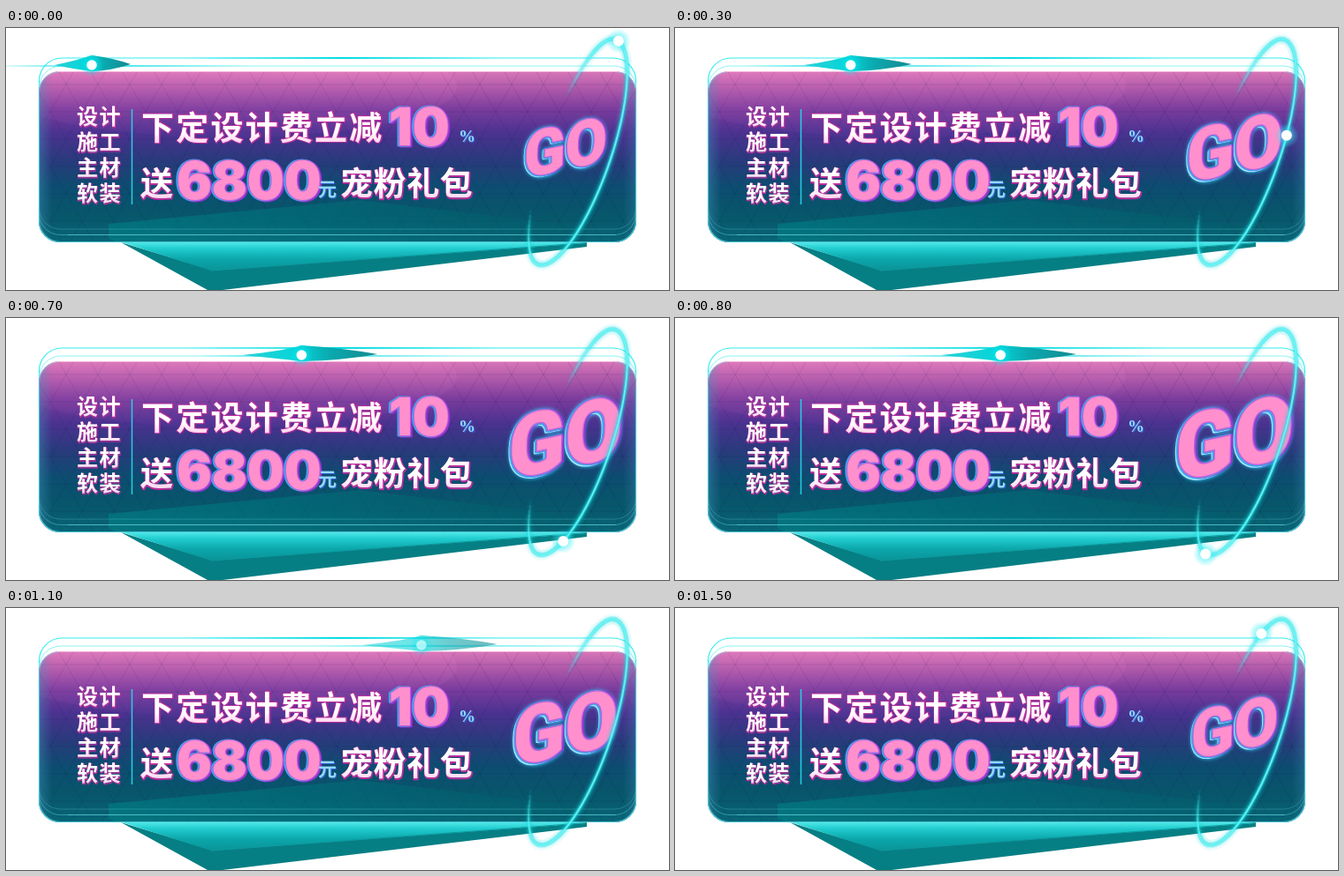
Recreate the animation shown at these times as an HTML page with a canvas. Size 750 px wide and 297 px high, loop 1.6 s.

```html
<!DOCTYPE html>
<html lang="zh-CN">
<head>
<meta charset="utf-8">
<style>
html, body { margin: 0; width: 100%; height: 100%; overflow: hidden; background: #fff; }
canvas { display: block; width: 750px; height: 297px; }
</style>
</head>
<body>
<canvas id="stage" width="750" height="297"></canvas>
<script>
const W = 750, H = 297, LOOP = 1600, STEP = 100;
const stage = document.getElementById('stage').getContext('2d');
const CJK = '"Noto Sans CJK SC", "Noto Sans CJK", sans-serif';
const clamp = v => Math.max(0, Math.min(1, v));

function gradient(ctx, x0, y0, x1, y1, stops) {
  const g = ctx.createLinearGradient(x0, y0, x1, y1);
  stops.forEach(([at, color]) => g.addColorStop(at, color));
  return g;
}

function glow(ctx, x, y, r, inner, outer) {
  const g = ctx.createRadialGradient(x, y, 0, x, y, r);
  g.addColorStop(0, inner);
  g.addColorStop(1, outer);
  ctx.fillStyle = g;
  ctx.fillRect(x - r, y - r, 2 * r, 2 * r);
}

function polygon(ctx, fill, ...points) {
  ctx.beginPath();
  points.forEach(([x, y]) => ctx.lineTo(x, y));
  ctx.closePath();
  ctx.fillStyle = fill;
  ctx.fill();
}

function line(ctx, x0, y0, x1, y1, color, width = 1) {
  ctx.beginPath();
  ctx.moveTo(x0, y0);
  ctx.lineTo(x1, y1);
  ctx.strokeStyle = color;
  ctx.lineWidth = width;
  ctx.stroke();
}

function frame(ctx, y, bottom, color, width = 1, radius = 24) {
  ctx.beginPath();
  ctx.roundRect(37.5, y, 675, bottom - y, radius);
  ctx.strokeStyle = color;
  ctx.lineWidth = width;
  ctx.stroke();
}

function drawPlatform(ctx) {
  polygon(ctx, '#067f84', [130, 243], [232, 274], [657, 243], [657, 248], [245, 297], [228, 297]);
  polygon(ctx, gradient(ctx, 0, 241, 0, 276, [[0, '#5df0ee'], [.25, '#22cdd0'], [.6, '#0ba6aa'], [1, '#0a9297']]),
    [122, 240], [657, 240], [657, 244], [232, 275]);
  line(ctx, 232, 275, 657, 243.5, '#0d9ba0');
}

function drawGrid(ctx) {
  const color = 'rgba(16,20,82,.13)', side = 36, rise = 31;
  for (let y = 64; y < 250; y += rise) line(ctx, 37, y, 713, y, color);
  for (let x = -130; x < 860; x += side) {
    line(ctx, x, 33, x + side * 3.5, 250, color);
    line(ctx, x, 33, x - side * 3.5, 250, color);
  }
}

function drawCard(ctx) {
  ctx.save();
  ctx.beginPath();
  ctx.rect(0, 0, W, 80);
  ctx.clip();
  frame(ctx, 34, 200, '#35eef0', 1.2, 26);
  frame(ctx, 43, 200, '#8cf2f3', 1, 25);
  ctx.restore();
  line(ctx, 200, 34, 560, 34, gradient(ctx, 200, 0, 560, 0,
    [[0, 'rgba(0,222,226,0)'], [.5, '#05dce0'], [1, 'rgba(0,222,226,0)']]), 2);

  ctx.save();
  ctx.beginPath();
  ctx.roundRect(37, 49, 676, 194, 24);
  ctx.clip();
  ctx.fillStyle = gradient(ctx, 0, 49, 0, 243, [
    [0, '#d977b8'], [.09, '#b45cab'], [.22, '#7b3c9d'], [.36, '#4b3290'],
    [.52, '#293a7c'], [.68, '#0c4d70'], [.85, '#07576a'], [1, '#086676']]);
  ctx.fillRect(37, 49, 676, 194);
  drawGrid(ctx);

  ctx.beginPath();
  ctx.ellipse(250, 66, 260, 58, 0, 0, 7);
  ctx.fillStyle = gradient(ctx, 0, 49, 0, 124, [[0, 'rgba(255,140,205,.16)'], [1, 'rgba(160,80,190,.07)']]);
  ctx.fill();

  polygon(ctx, gradient(ctx, 116, 0, 657, 0, [[0, 'rgba(0,128,134,.6)'], [.5, 'rgba(0,112,122,.5)'], [1, 'rgba(0,92,105,.35)']]),
    [116, 238], [116, 222], [400, 195], [657, 226], [657, 243], [125, 243]);
  ctx.fillStyle = gradient(ctx, 37, 0, 52, 0, [[0, 'rgba(70,150,190,.4)'], [1, 'rgba(70,150,190,0)']]);
  ctx.fillRect(37, 49, 15, 194);
  ctx.fillStyle = gradient(ctx, 698, 0, 713, 0, [[0, 'rgba(70,150,190,0)'], [1, 'rgba(70,150,190,.3)']]);
  ctx.fillRect(698, 49, 15, 194);
  frame(ctx, 49.5, 228, 'rgba(110,230,240,.25)');
  frame(ctx, 49.5, 234.5, 'rgba(110,230,240,.4)');
  line(ctx, 70, 234.5, 690, 234.5, 'rgba(110,240,245,.4)');
  ctx.restore();

  ctx.save();
  ctx.beginPath();
  ctx.rect(0, 80, W, 180);
  ctx.clip();
  frame(ctx, 49, 242.5, '#4cc3d4', 1.2);
  ctx.restore();
  line(ctx, 58, 49.5, 692, 49.5, '#f5b5dc');
}

function label(ctx, text, x, y, size, spacing) {
  ctx.font = `700 ${size}px ${CJK}`;
  ctx.letterSpacing = spacing + 'px';
  ctx.textAlign = 'left';
  ctx.textBaseline = 'middle';
  ctx.lineJoin = 'round';
  ctx.lineWidth = size / 18;
  ctx.strokeStyle = '#b82d9c';
  ctx.strokeText(text, x + .6, y + .9);
  ctx.fillStyle = gradient(ctx, 0, y - size / 2, 0, y + size / 2, [[0, '#fff'], [.65, '#fff'], [1, '#ffd0ed']]);
  ctx.fillText(text, x, y);
}

function small(ctx, text, x, y, font) {
  ctx.font = font;
  ctx.letterSpacing = '0px';
  ctx.textAlign = 'left';
  ctx.textBaseline = 'alphabetic';
  ctx.fillStyle = '#3665d8';
  ctx.fillText(text, x + 1, y + 1);
  ctx.fillStyle = '#91d9fa';
  ctx.fillText(text, x, y);
}

function pinkText(ctx, text, x, y, font, spacing, depth) {
  ctx.font = font;
  ctx.letterSpacing = spacing + 'px';
  ctx.textAlign = 'left';
  ctx.textBaseline = 'alphabetic';
  ctx.lineJoin = 'round';
  const outline = (dx, dy, color, width) => {
    ctx.strokeStyle = color;
    ctx.lineWidth = width;
    ctx.strokeText(text, x + dx, y + dy);
  };
  outline(depth, depth * .5, '#9a32d2', 3);
  outline(-depth, depth * .3, '#3aa6ee', 3);
  outline(0, 0, '#bd62d8', 2);
  ctx.fillStyle = '#ff8fcd';
  ctx.fillText(text, x, y);
}

function drawCopy(ctx) {
  ['设计', '施工', '主材', '软装'].forEach((word, i) => label(ctx, word, 80, 100 + i * 29, 24, 1.5));
  line(ctx, 142.5, 92, 142.5, 200, '#27cfe3', 1.5);
  label(ctx, '下定设计费立减', 153, 112.5, 37, 2.2);
  label(ctx, '送', 152, 176, 37, 0);
  label(ctx, '宠粉礼包', 378, 176, 37, .6);
  const digits = '900 59px Inter, Arial, sans-serif';
  pinkText(ctx, '10', 433, 133, digits, 0, 1.2);
  pinkText(ctx, '6800', 193, 194, digits, 0, 1.2);
  small(ctx, '%', 512, 128.5, '700 19px "Liberation Serif", serif');
  small(ctx, '元', 353, 190, `700 21px ${CJK}`);
}

function drawGo(ctx, t) {
  const scale = 1 + .42 * (1 - Math.abs(t / 800 - 1));
  ctx.save();
  ctx.translate(633, 134.5);
  ctx.scale(scale, scale);
  ctx.rotate(-.21);
  ctx.transform(1, 0, -.24, 1, 0, 0);
  ctx.font = '900 70px Roboto, Inter, sans-serif';
  ctx.letterSpacing = '0px';
  ctx.textAlign = 'left';
  ctx.textBaseline = 'alphabetic';
  const x = -ctx.measureText('GO').width / 2, y = 25;
  ctx.lineJoin = 'round';
  ctx.shadowColor = '#36cdf4';
  ctx.shadowBlur = 4;
  ctx.strokeStyle = '#2399dc';
  ctx.lineWidth = 4;
  ctx.strokeText('GO', x - .5, y + .8);
  ctx.shadowBlur = 0;
  ctx.strokeStyle = '#a5e6fa';
  ctx.lineWidth = 2.5;
  ctx.strokeText('GO', x - 1.8, y + 1.2);
  pinkText(ctx, 'GO', x, y, ctx.font, 0, .8);
  ctx.restore();
}

// Tilted orbit, sampled so the spark can travel it at constant speed.
const TILT = 18.9 * Math.PI / 180, SAMPLES = 720, START = 6;
function orbitPoint(degrees) {
  const a = degrees * Math.PI / 180;
  const u = 135 * Math.cos(a), v = (Math.sin(a) > 0 ? 39 : 34) * Math.sin(a);
  return [645.5 + u * Math.sin(TILT) + v * Math.cos(TILT),
          140.5 - u * Math.cos(TILT) + v * Math.sin(TILT)];
}
const lengths = [0];
for (let i = 1; i <= SAMPLES; i++) {
  const [x0, y0] = orbitPoint(START + (i - 1) / 2), [x1, y1] = orbitPoint(START + i / 2);
  lengths.push(lengths[i - 1] + Math.hypot(x1 - x0, y1 - y0));
}
function orbitAngle(progress) {
  const goal = progress * lengths[SAMPLES];
  return (START + lengths.findIndex(l => l >= goal) / 2) % 360;
}

function drawRing(ctx) {
  const strand = (width, color, strength) => {
    ctx.strokeStyle = color;
    ctx.lineWidth = width;
    for (let a = 0; a < 360; a += 3) {
      ctx.globalAlpha = strength * clamp((Math.abs(a - 263) - 30) / 35);
      ctx.beginPath();
      ctx.moveTo(...orbitPoint(a));
      ctx.lineTo(...orbitPoint(a + 3.1));
      ctx.stroke();
    }
  };
  ctx.save();
  strand(12, '#16d8df', .1);
  strand(7, '#17e2e8', .25);
  strand(4, '#17e2e8', .5);
  strand(2, '#6ff5f4', .9);
  ctx.restore();
}

function drawSpark(ctx, t) {
  const angle = orbitAngle(t / LOOP), [x, y] = orbitPoint(angle);
  const alpha = clamp((Math.abs(angle - 268) - 17) / 25);
  if (!alpha) return;
  ctx.save();
  ctx.globalAlpha = alpha;
  glow(ctx, x, y, 14, 'rgba(80,250,250,.9)', 'rgba(40,230,240,0)');
  ctx.beginPath();
  ctx.arc(x, y, 6, 0, 7);
  ctx.fillStyle = '#fff';
  ctx.fill();
  ctx.restore();
}

function drawFlare(ctx, t) {
  const alpha = clamp((1250 - t) / 250);
  if (!alpha) return;
  const x = 97 + t * .339, y = 42, back = 42 + 25 * clamp(t / 700), ahead = 44 + 42 * clamp(t / 500);
  ctx.save();
  ctx.globalAlpha = alpha;
  line(ctx, x - 120, 43, x + 180, 43, gradient(ctx, x - 120, 0, x + 180, 0,
    [[0, 'rgba(0,222,226,0)'], [.4, '#05dce0'], [1, 'rgba(0,222,226,0)']]), 1.5);
  ctx.beginPath();
  ctx.moveTo(x - back, y);
  ctx.quadraticCurveTo(x - 18, y - 5, x, y - 11);
  ctx.quadraticCurveTo(x + ahead * .55, y - 8, x + ahead, y - 1);
  ctx.quadraticCurveTo(x + ahead * .55, y + 6, x, y + 7);
  ctx.quadraticCurveTo(x - 18, y + 5, x - back, y);
  ctx.fillStyle = gradient(ctx, x - back, 0, x + ahead, 0,
    [[0, '#2cd0d4'], [.4, '#05d5da'], [.65, '#0aa9af'], [1, '#16898f']]);
  ctx.fill();
  glow(ctx, x, y, 13, 'rgba(0,240,242,1)', 'rgba(0,225,230,0)');
  ctx.beginPath();
  ctx.arc(x, y, 5.8, 0, 7);
  ctx.fillStyle = '#fff';
  ctx.fill();
  ctx.restore();
}

const backdrop = document.createElement('canvas');
backdrop.width = W;
backdrop.height = H;
const back = backdrop.getContext('2d');
back.fillStyle = '#fff';
back.fillRect(0, 0, W, H);
drawPlatform(back);
drawCard(back);
drawCopy(back);

function render(now) {
  const t = Math.floor(now % LOOP / STEP) * STEP;
  stage.drawImage(backdrop, 0, 0);
  drawFlare(stage, t);
  drawGo(stage, t);
  drawRing(stage);
  drawSpark(stage, t);
}

const start = performance.now();
function tick() {
  render(performance.now() - start);
  requestAnimationFrame(tick);
}
tick();
</script>
</body>
</html>
```
